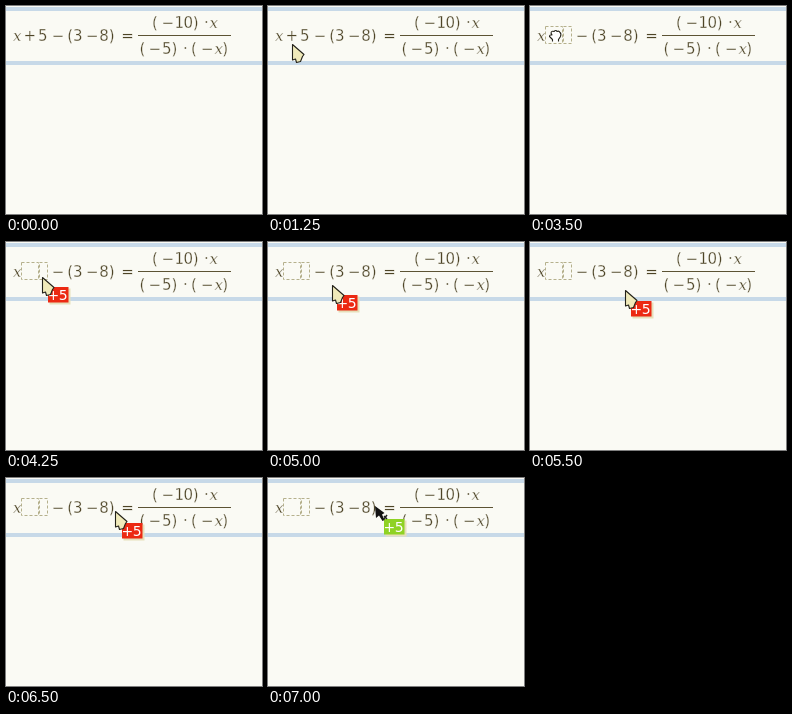
Write an HTML page that moves like this. It is 256x208 px and loops after 8 s.

```html
<!DOCTYPE html>
<html lang="en">
<head>
<meta charset="utf-8">
<title>Dragging a term in an equation</title>
<style>
html, body { margin: 0; width: 100%; height: 100%; overflow: hidden; background: #fafaf4; }
svg { display: block; width: 256px; height: 208px; }
/* the background-coloured stroke thins the letters */
text { font: 15px "DejaVu Sans", sans-serif; fill: #4d4426; stroke: #fafaf4; stroke-width: .3; white-space: pre; }
.var { font-family: "DejaVu Serif", serif; font-style: italic; }
#term, #glow, #slots, #arrow, #hand, #fist, #target, #tag, #tagbox {
  animation: 8s step-end infinite;
}
.outline { stroke: #24221a; stroke-width: 1.1; stroke-linejoin: round; }
#term { animation-name: term; }
#glow { animation-name: glow; }
#slots { animation-name: slots; fill: none; stroke: #b5b08c; stroke-dasharray: 3 2; }
#arrow { animation-name: arrow; fill: #f0eaba; }
#hand { animation-name: hand; fill: #fff; }
#fist { animation-name: fist; fill: #fff; }
#target { animation-name: target; }
#tag { animation-name: tag; }
#tag text { fill: #fff; stroke: none; font-size: 14px; }
#tagbox { animation-name: tagbox; }

@keyframes term {
  0% { fill: #4d4426; stroke: #fafaf4; opacity: 1; }
  18.75% { fill: #4d4426; stroke: none; opacity: 1; }
  31.25% { fill: #f3e2d8; stroke: none; opacity: 1; }
  37.5% { fill: #f3e2d8; stroke: none; opacity: .6; }
  40.625%, 100% { opacity: 0; }
}
@keyframes glow {
  0% { opacity: 0; }
  18.75% { opacity: .25; }
  21.875% { opacity: .45; }
  31.25% { opacity: 1; }
  37.5% { opacity: .5; }
  40.625%, 100% { opacity: 0; }
}
@keyframes slots {
  0% { opacity: 0; }
  40.625%, 100% { opacity: 1; }
}
@keyframes arrow {
  0% { transform: translate(179px, 220px); }
  9.375% { transform: translate(179px, 202px); }
  12.5% { transform: translate(29px, 46px); }
  15.625% { transform: translate(24px, 38px); }
  18.75% { transform: translate(24px, 31px); }
  21.875% { transform: translate(24px, 220px); }
  50% { transform: translate(38px, 36px); }
  53.125% { transform: translate(36px, 35px); }
  56.25% { transform: translate(37px, 36px); }
  59.375% { transform: translate(42px, 39px); }
  62.5% { transform: translate(64px, 43px); }
  65.625% { transform: translate(77px, 45px); }
  68.75% { transform: translate(95px, 48px); }
  71.875% { transform: translate(105px, 49px); }
  75% { transform: translate(107px, 46px); }
  78.125% { transform: translate(109px, 42px); }
  81.25% { transform: translate(109px, 33px); }
  84.375%, 100% { transform: translate(107px, 220px); }
}
@keyframes tag {
  0% { transform: translate(43px, 220px); }
  50% { transform: translate(44px, 46px); }
  53.125% { transform: translate(42px, 45px); }
  56.25% { transform: translate(43px, 46px); }
  59.375% { transform: translate(47px, 49px); }
  62.5% { transform: translate(69px, 53px); }
  65.625% { transform: translate(83px, 56px); }
  68.75% { transform: translate(101px, 59px); }
  71.875% { transform: translate(112px, 60px); }
  75% { transform: translate(114px, 57px); }
  78.125% { transform: translate(116px, 53px); }
  81.25% { transform: translate(116px, 45px); }
  84.375% { transform: translate(116px, 43px); }
  87.5%, 100% { transform: translate(116px, 41px); }
}
@keyframes tagbox {
  0% { fill: #ec2912; }
  84.375%, 100% { fill: #8fd223; }
}
@keyframes hand {
  0% { transform: translate(20px, 220px); }
  21.875% { transform: translate(19px, 23px); }
  25% { transform: translate(20px, 20px); }
  37.5%, 100% { transform: translate(20px, 220px); }
}
@keyframes fist {
  0% { opacity: 0; }
  37.5% { opacity: 1; }
  50%, 100% { opacity: 0; }
}
@keyframes target {
  0% { transform: translate(107px, 220px); }
  84.375% { transform: translate(108px, 30px); }
  87.5%, 100% { transform: translate(107px, 28px); }
}
</style>
</head>
<body>
<svg viewBox="0 0 256 208">
  <rect width="256" height="208" fill="#fafaf4"/>
  <path d="M0 1h256v4H0zM0 55h256v4H0z" fill="#c7d9e8"/>

  <text class="var" x="7" y="35">x</text>
  <text x="45.8 61.2 67 80 93.2 102.7 115.3" y="35">−(3−8)=</text>
  <text x="146 155.5 168.500 177.5 186.7 198" y="22">(−10)·</text>
  <text class="var" x="203.500" y="22">x</text>
  <path d="M132 29.5h93" stroke="#5c5334"/>
  <text x="133.5 142.5 156 165.5 177 185 195 216.2" y="47.500">(−5)·(−)</text>
  <text class="var" x="208.5" y="47.500">x</text>

  <rect id="glow" x="15" y="20" width="27" height="18" fill="#b08476"/>
  <text id="term" x="17.4 32" y="35">+5</text>
  <path id="slots" d="M15.5 20.5h17v17h-17zM33.5 20.5h8v17h-8z"/>

  <path id="fist" class="outline" d="M22.5 35.5v-2l-3-3q0-2 2.500-1.500l-1-2q.5-2.500 3-1.500q2-2 3 0q2-1 3 1q1.500 1 .500 4l-2 3v2"/>
  <path id="hand" class="outline" d="M4.5 16.5L.5 9q1-2 3 0L2 3q1-2 2.500 0L6 7V1.500q1.500-1.500 2.500 0V7l1-5q1.500-1.200 2.300.5L11 8l1.500-3q1.500-.8 1.500 1L12 13l-1 3.500z"/>

  <g id="tag">
    <rect x="1.500" y="1.500" width="21" height="16" fill="#e6dfba"/>
    <rect id="tagbox" width="20.500" height="15.500"/>
    <text x="-.5 10.700" y="13">+5</text>
  </g>
  <path id="arrow" class="outline" d="M.5.5V16l3-1 1 3.500 4-1 2-5 1.500-2z"/>
  <g id="target">
    <path d="M0 0L1 12 4 9.500 7.500 15 9.500 14 7 8.500 9.500 7z" fill="#111"/>
    <path d="M12 9L8.500 13.500M9 10l3 3" stroke="#222" stroke-width="1.500"/>
  </g>
</svg>
</body>
</html>
```
